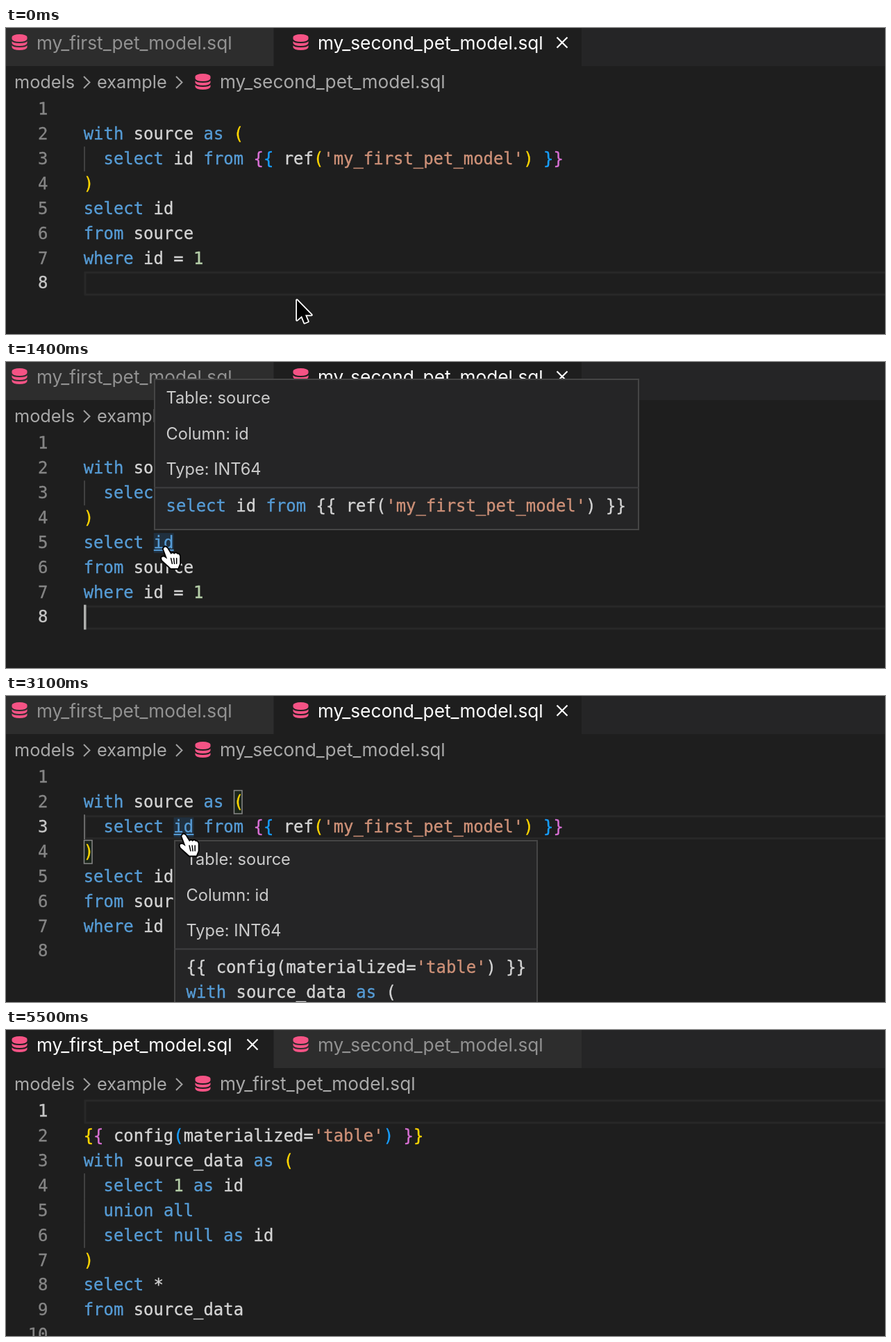
An HTML page with a canvas for the animation above (5.8 s loop, 1266x442 px).

```html
<!DOCTYPE html>
<html lang="en">
<head>
<meta charset="utf-8">
<title>Go to definition</title>
<style>
  html, body { margin: 0; height: 100%; overflow: hidden; background: #1e1e1e; }
  canvas { display: block; }
</style>
</head>
<body>
<canvas id="stage" width="1266" height="442"></canvas>
<script>
const ctx = document.getElementById('stage').getContext('2d');
const LOOP = 5800, STEP = 100;
const CODE = '23.92px "DejaVu Sans Mono", monospace';
const CHAR = 14.4, LEFT = 112, PITCH = 35.88;
const KEYWORDS = /^(with|as|select|from|where|union|all|null)$/;
const BRACKETS = ['#ffd700', '#da70d6', '#179fff'];
const LINK = '#569cd6', TEXT = '#d4d4d4';

const FIRST = 'my_first_pet_model', SECOND = 'my_second_pet_model';
const REF_LINE = `select id from {{ ref('${FIRST}') }}`;
const CONFIG_LINE = "{{ config(materialized='table') }}";
const firstFile = ['', CONFIG_LINE, 'with source_data as (', '  select 1 as id',
  '  union all', '  select null as id', ')', 'select *', 'from source_data', ''];
const secondFile = ['', 'with source as (', '  ' + REF_LINE, ')',
  'select id', 'from source', 'where id = 1', ''];

// start, end, left, top, width, height, previewed code
const popups = [
  [800, 1100, 213, 82, 460, 161, []],
  [1300, 1600, 213, 24, 699, 219, [REF_LINE]],
  [2100, 2500, 213, 82, 414, 161, []],
  [3100, 3900, 242, 208, 524, 260, [CONFIG_LINE, 'with source_data as (']]
];

// time, x, y of the pointer's hot spot
const pointerPath = [
  [0, 418, 392], [600, 237, 297], [800, 231.5, 266], [2200, 231.5, 266], [2450, 138, 317],
  [2600, 138, 317], [3000, 258, 198.5], [4400, 258, 198.5], [4900, 592, 403], [5100, 668, 480]
];

const arrow = new Path2D('M1,1 V30 L8,24 L12,34 L17,32 L13,22.500 H22 Z');
const hand = new Path2D('M-3,2 Q-1,-3 3,1 L9,10 Q12,7 14,10 Q17,7 19,10 Q22,9 23,13 V24 L20,31 H9 L-5,19 Q-8,13 -2,14 L3,17 Z');
const fingers = new Path2D('M9,16 L11,24 M13.500,16 L14.500,24 M18,16 V24');
const beam = new Path2D('M-6,-15 Q0,-15 0,-10 Q0,-15 6,-15 M0,-10 V10 M-6,15 Q0,15 0,10 Q0,15 6,15 M-4,5 H4');

const between = (t, start, end) => t >= start && t < end;
const lineTop = n => 99.5 + PITCH * (n - 1);
const baseline = n => 125.3 + PITCH * (n - 1);

function box(x, y, w, h, color) {
  ctx.fillStyle = color;
  ctx.fillRect(x, y, w, h);
}

function frame(x, y, w, h, color, width) {
  ctx.strokeStyle = color;
  ctx.lineWidth = width;
  ctx.strokeRect(x, y, w, h);
}

function stroke(path, color, width) {
  ctx.strokeStyle = color;
  ctx.lineWidth = width;
  ctx.stroke(path);
}

function label(text, x, y, color, size) {
  ctx.font = `${size}px Inter, sans-serif`;
  ctx.fillStyle = color;
  ctx.fillText(text, x, y);
}

// a hairline outline gives the code its slightly heavier weight
function codeText(text, x, y, color) {
  ctx.font = CODE;
  ctx.fillStyle = ctx.strokeStyle = color;
  ctx.lineWidth = 0.35;
  ctx.fillText(text, x, y);
  ctx.strokeText(text, x, y);
}

function tokenColor(token, nesting) {
  if (token[0] === "'") return '#ce9178';
  if (/^\d/.test(token)) return '#b5cea8';
  if (KEYWORDS.test(token)) return '#569cd6';
  if (nesting && /[({]/.test(token)) return BRACKETS[nesting.depth++ % 3];
  if (nesting && /[)}]/.test(token)) return BRACKETS[--nesting.depth % 3];
  return TEXT;
}

function codeLine(line, x, y, nesting) {
  for (const m of line.matchAll(/'[^']*'|\w+|[(){}]|[^\w'(){}]+/g)) {
    codeText(m[0], x + m.index * CHAR, y, tokenColor(m[0], nesting));
  }
}

function databaseIcon(x, y) {
  ctx.fillStyle = '#f55385';
  ctx.beginPath();
  ctx.ellipse(x + 11.5, y + 4, 11, 4, 0, 0, 7);
  ctx.fill();
  for (const dy of [4, 10, 16]) {
    const top = y + dy;
    ctx.fill(new Path2D(`M${x + .5},${top} Q${x + 2},${top + 3} ${x + 11.5},${top + 3}
      T${x + 22.5},${top} V${top + 3} Q${x + 21},${top + 7} ${x + 11.5},${top + 7}
      T${x + .5},${top + 3} Z`));
  }
}

function tab(x, width, name, textX, active) {
  box(x, 0, width, 56, active ? '#1e1e1e' : '#2d2d2d');
  databaseIcon(textX - 36, 9);
  label(name + '.sql', textX, 30.5, active ? '#fff' : '#929292', 26.25);
  if (active) {
    const c = x ? 793.5 : 347.5;
    stroke(new Path2D(`M${c},13.500 l15,15 m0,-15 l-15,15`), '#fff', 2.2);
  }
}

function header(firstActive) {
  box(0, 0, 1266, 55, '#252526');
  tab(0, 385, FIRST, 44, firstActive);
  tab(386, 443, SECOND, 449, !firstActive);
  box(0, 55, 1266, 45, '#1e1e1e');
  label('models', 12, 87, '#a9a9a9', 25.3);
  label('example', 131, 87, '#a9a9a9', 25.3);
  for (const x of [112, 245]) stroke(new Path2D(`M${x},70 l8.500,8.500 l-8.500,8.500`), '#a0a0a0', 2);
  databaseIcon(272, 66);
  label((firstActive ? FIRST : SECOND) + '.sql', 308, 87, '#a9a9a9', 26.25);
}

function editor(lines, current, caretColumn, caretOn) {
  const top = lineTop(current);
  frame(LEFT + 2, top + 2.5, 1200, PITCH - 4, '#282828', 3);
  if (current === 3) {
    for (const [x, y] of [[328.5, 136.5], [112.5, 208.5]]) {
      box(x, y, 11.5, 33.5, 'rgba(0, 100, 0, 0.1)');
      frame(x, y, 11.5, 33.5, '#888', 1.5);
    }
  }
  const nesting = { depth: 0 };
  lines.forEach((line, i) => {
    const n = i + 1;
    if (line[0] === ' ') box(LEFT, lineTop(n), 2, PITCH, current === 3 ? '#686868' : '#404040');
    ctx.textAlign = 'right';
    codeText(n, 60.5, baseline(n), n === current ? '#c6c6c6' : '#858585');
    ctx.textAlign = 'left';
    codeLine(line, LEFT - 0.3, baseline(n), nesting);
  });
  if (caretOn) box(LEFT + caretColumn * CHAR - (caretColumn ? 2 : 0), top, 3.5, PITCH, '#aeafad');
}

function linkedId(line, column, highlighted) {
  const x = LEFT + column * CHAR, y = baseline(line);
  box(x, lineTop(line) + 4, 2 * CHAR, PITCH - 7, highlighted ? '#20303f' : '#1e1e1e');
  codeText('id', x - 0.3, y, LINK);
  box(x, y + 2, 2 * CHAR, 2, LINK);
}

function popup([, , x, y, w, h, preview]) {
  box(x, y, w, h, '#252526');
  frame(x + 1, y + 1, w - 2, h - 2, '#454545', 2);
  ['Table: source', 'Column: id', 'Type: INT64'].forEach((text, i) =>
    label(text, x + 17.5, y + 36 + i * 51.7, '#ccc', 23.6));
  if (preview.length) box(x, y + 156.5, w, 2, '#3f3f40');
  preview.forEach((line, i) => codeLine(line, x + 17.5, y + 192 + i * 36));
}

function pointer(t) {
  const i = pointerPath.findIndex(p => p[0] > t);
  if (i < 0) return;
  const [t0, x0, y0] = pointerPath[i - 1], [t1, x1, y1] = pointerPath[i];
  const u = (t - t0) / (t1 - t0), k = u * u * (3 - 2 * u);
  ctx.save();
  ctx.translate(x0 + (x1 - x0) * k, y0 + (y1 - y0) * k);
  ctx.lineJoin = ctx.lineCap = 'round';
  if (t < 200) {
    stroke(arrow, '#fff', 3.5);
    ctx.fillStyle = '#000';
    ctx.fill(arrow);
  } else if (between(t, 1100, 1900) || between(t, 3100, 4000)) {
    ctx.translate(-2, 2);
    ctx.scale(0.9, 0.97);
    stroke(hand, '#000', 4);
    ctx.fillStyle = '#fff';
    ctx.fill(hand);
    stroke(fingers, '#000', 1.7);
  } else {
    stroke(beam, '#fff', 5);
    stroke(beam, '#000', 2.2);
  }
  ctx.restore();
}

function draw(now) {
  const t = Math.floor(now % LOOP / STEP) * STEP;
  const firstActive = t >= 4100, jumped = t >= 1600;
  const blinkStart = t >= 4000 ? 4000 : jumped ? 1600 : 100;
  const caretOn = t >= 100 && Math.floor((t - blinkStart) / 500) % 2 === 0;
  const open = popups.find(p => between(t, p[0], p[1]));

  box(0, 0, 1266, 442, '#1e1e1e');
  header(firstActive);
  if (firstActive) {
    editor(firstFile, 1, 0, caretOn);
  } else {
    const column = t >= 4000 ? 10 : jumped ? 9 : 0;
    editor(secondFile, jumped ? 3 : 8, column, caretOn);
    if (between(t, 1100, 1600)) linkedId(5, 7, open);
    if (t >= 3100) linkedId(3, 9, open);
    if (open) popup(open);
  }
  pointer(t);
  requestAnimationFrame(() => draw(performance.now()));
}
draw(performance.now());
</script>
</body>
</html>
```
